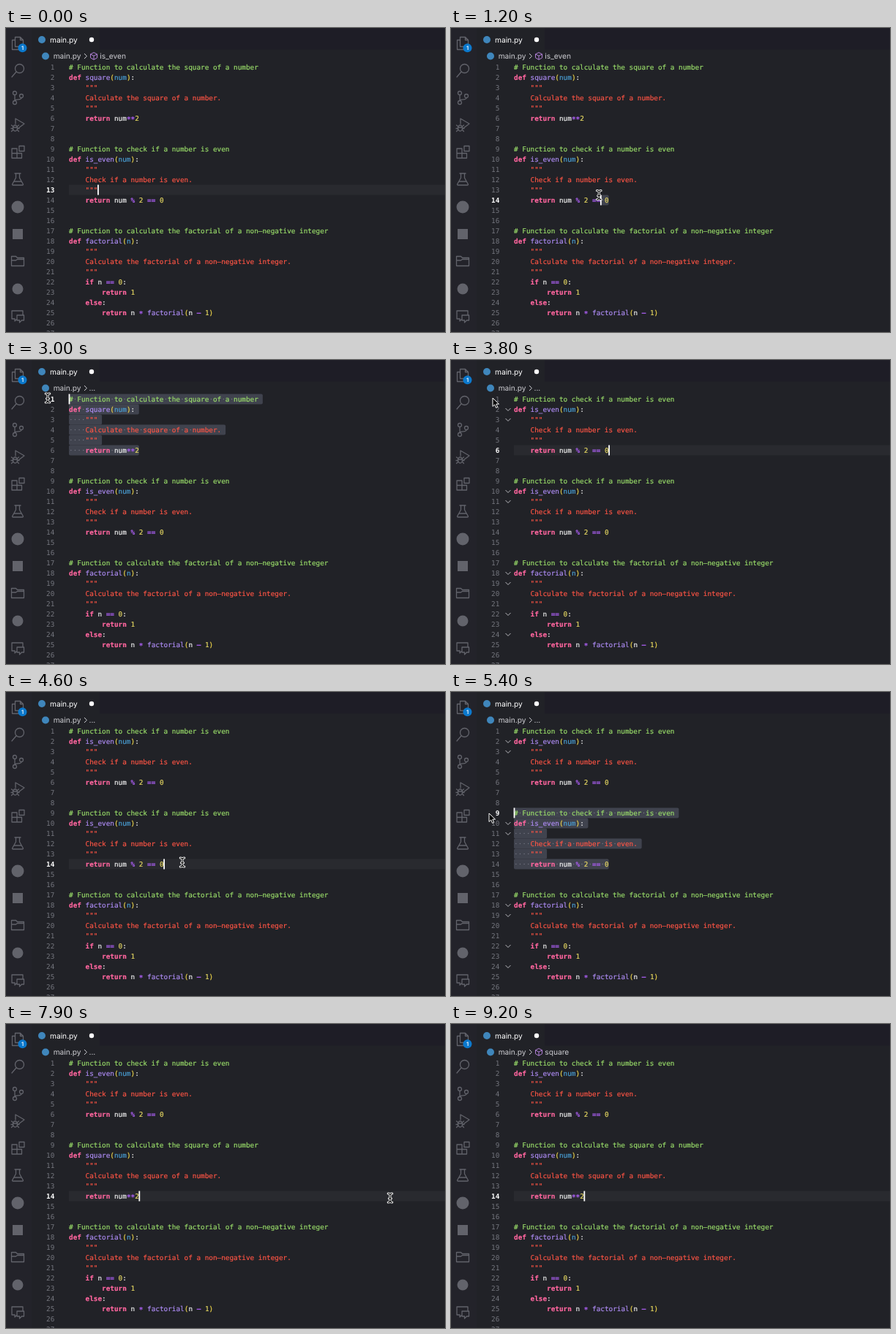
Write an HTML page that moves like this. It is 600 by 416 pixels and loops after 9.3 s.

```html
<!DOCTYPE html>
<html lang="en">
<head>
<meta charset="utf-8">
<title>Code editor</title>
<style>
  html, body { margin: 0; width: 100%; height: 100%; overflow: hidden; background: #212227; }
  svg { display: block; width: 100vw; height: 100vh; }
  text { text-rendering: geometricPrecision; }
  .code { font: 9.36px "DejaVu Sans Mono", "Liberation Mono", monospace; }
  .code text { stroke-width: .18; }
  .ui { font: 10.2px Inter, "Open Sans", sans-serif; }
  .icons { fill: none; stroke: #62636b; stroke-width: 1.3; stroke-linejoin: round; stroke-linecap: round; }
  .icons .solid { fill: #62636b; stroke: none; }
</style>
</head>
<body>
<svg viewBox="0 0 600 416" preserveAspectRatio="none">
  <rect width="600" height="416" fill="#212227"/>
  <rect x="35" width="565" height="29.5" fill="#1e1d26"/>
  <rect x="35" width="93" height="30" fill="#212227"/>
  <rect width="35" height="416" fill="#23232a"/>

  <g class="icons">
    <path d="M12.500 12.500h7l4 4v9h-11zM19.500 12.500v4h4M12.500 16.500h-4v13h9v-4"/>
    <g transform="translate(16 58)"><circle cx="2.500" cy="-2.500" r="6"/><path d="M-2 2l-6 7"/></g>
    <g transform="translate(16 95)">
      <circle cx="-4" cy="-6" r="2.500"/><circle cx="-4" cy="7" r="2.500"/><circle cx="5" cy="-2" r="2.500"/>
      <path d="M-4-3.500v8M5 .500c0 3-4 2-8 3"/>
    </g>
    <g transform="translate(16 133)">
      <path d="M-3-2v-7l12 7-8 6"/><ellipse cx="-3.500" cy="4" rx="3" ry="4"/>
      <path d="M-6.500 3h6M-8.500 0l2 1.500M-9 4.500h2.500M-8.500 8.500l2-2M1.500 0l-2 1.500M2 4.500h-2.500M1.500 8.500l-2-2"/>
    </g>
    <g transform="translate(16 170)"><path d="M-8-5h7v13h-7zM-8 1.500h13.500v6.500h-6.500"/><rect x="2" y="-8.500" width="7" height="7"/></g>
    <g transform="translate(16 207)"><path d="M-4-8h8M-2.500-8v6l-5 9q0 1 1 1h13q1 0 1-1l-5-9v-6M-5 3h10"/></g>
    <circle class="solid" cx="16" cy="245" r="8.500"/>
    <rect class="solid" x="9" y="275" width="14" height="14"/>
    <g transform="translate(16 319)"><path d="M-8.500-6.500h6l2 2h9v11h-17zM-8.500-1h6l2-1.500h9"/></g>
    <circle class="solid" cx="16" cy="357" r="7.500"/>
    <g transform="translate(16 394)"><path d="M-4 4h-4v-11h15v5M-4 4v3l2-2M-1-1h9.500v7h-3l-3 3v-3h-3.500z"/></g>
  </g>
  <circle cx="22.500" cy="27.300" r="6" fill="#0b78cc"/>
  <text class="ui" x="22.500" y="30" fill="#fff" style="font-size:7.500px;font-weight:600" text-anchor="middle">1</text>

  <circle cx="49" cy="16" r="5" fill="#3f86bb"/>
  <text class="ui" x="60" y="19.800" fill="#fff">main.py</text>
  <circle cx="117" cy="16" r="3.200" fill="#fff"/>
  <circle cx="54" cy="38.500" r="5" fill="#3f86bb"/>
  <text class="ui" x="64.700" y="42" fill="#cdcdd2">main.py</text>
  <path d="M107 35l3.500 3.500-3.500 3.500" fill="none" stroke="#cdcdd2"/>
  <path id="cube" d="M120 33.500l4.500 2.300v5l-4.500 2.500-4.500-2.500v-5zM115.500 35.800l4.500 2.400 4.500-2.400M120 38.200v5" fill="none" stroke="#b180d7"/>
  <text id="crumb" class="ui" y="42" fill="#cdcdd2"></text>

  <g id="editor" class="code"></g>
  <path id="arrow" d="M0 0v11.500l2.700-2.500 1.900 4.400 2.100-.9-1.900-4.300h3.700z" fill="#000" stroke="#fff"/>
  <g id="beam" fill="none" stroke-linecap="round">
    <use href="#bar" stroke="#fff" stroke-width="3"/>
    <use href="#bar" stroke="#000" stroke-width="1.100"/>
  </g>
  <defs><path id="bar" d="M-2.800-6q2.800 0 2.800 2v8q0 2-2.800 2M2.800-6q-2.800 0-2.800 2v8q0 2 2.800 2M-1.500 .800h3"/></defs>
</svg>
<script>
const LOOP = 9300, LEFT = 86, TOP = 46.5, ROW = 14, BASE = 10.2, CHAR = 5.635;
const $ = id => document.getElementById(id);

const func = (what, sign, doc, body) =>
  [`# Function to ${what}`, `def ${sign}:`, '    """', `    ${doc}.`, '    """', ...body.map(s => '    ' + s)];
const SQUARE = func('calculate the square of a number', 'square(num)',
  'Calculate the square of a number', ['return num**2']);
const EVEN = func('check if a number is even', 'is_even(num)',
  'Check if a number is even', ['return num % 2 == 0']);
const FACTORIAL = func('calculate the factorial of a non–negative integer', 'factorial(n)',
  'Calculate the factorial of a non–negative integer',
  ['if n == 0:', '    return 1', 'else:', '    return n * factorial(n – 1)']);

const COLOR = {
  comment: '#9ade6a', doc: '#ff5545', keyword: '#ff669f', name: '#ae8cf5', param: '#4aa0d6',
  bracket: '#f3d94a', number: '#e8da62', operator: '#a45ce8', plain: '#f4f4f4'
};
const BOLD = ['keyword', 'operator'];

// Pointer stops: time, x, y
const PATH = [
  [500, 262, 300], [1000, 219, 236], [1100, 219, 236], [1600, 58, 165], [2200, 58, 165],
  [2500, 190, 124], [2600, 190, 124], [2900, 57, 52], [4000, 57, 52], [4400, 241, 233],
  [4700, 241, 233], [5300, 52, 166], [6300, 52, 166], [6800, 525, 238], [8500, 525, 238]
];
// Drags upwards from a line's end: press, release, time the selection ends, line
const DRAGS = [[1100, 1600, 2600, 14], [2600, 3100, 3500, 6], [4500, 5400, 6800, 14]];
const BLINKS = [0, 1100, 1600, 2600, 3000, 3500, 4500, 5300, 5900, 6800];

function pointer(t) {
  const i = PATH.findIndex(p => p[0] > t);
  if (i < 1) return PATH[i < 0 ? PATH.length - 1 : 0].slice(1);
  const [t0, x0, y0] = PATH[i - 1], [t1, x1, y1] = PATH[i];
  const u = (t - t0) / (t1 - t0), e = u * u * (3 - 2 * u);
  return [x0 + (x1 - x0) * e, y0 + (y1 - y0) * e];
}

const rowTop = line => TOP + (line - 1) * ROW;
const colX = col => LEFT + col * CHAR;
const rect = (x, y, w, h, fill, r = 0) =>
  `<rect x="${x}" y="${y}" width="${w}" height="${h}" rx="${r}" fill="${fill}"/>`;

function label(x, line, s, kind) {
  const color = COLOR[kind];
  const drop = s[0] === '*' ? 1.6 : 0; // centre asterisks on the row
  return `<text x="${x}" y="${rowTop(line) + BASE + drop}" fill="${color}" stroke="${color}"` +
    `${BOLD.includes(kind) ? ' font-weight="700"' : ''}>${s}</text>`;
}

function kindOf(word, rest, isDef) {
  if (/^(def|return|if|else)$/.test(word)) return 'keyword';
  if (/^\d/.test(word)) return 'number';
  if (/^[()]/.test(word)) return 'bracket';
  if (/^[*%=–]/.test(word)) return 'operator';
  if (rest[0] === '(') return 'name';
  return isDef && word !== ':' ? 'param' : 'plain';
}

function drawLine(s, line) {
  const trimmed = s.trim(), start = colX(s.length - trimmed.length);
  if (s[0] === '#') return label(LEFT, line, s, 'comment');
  if (/^("""|[A-Z])/.test(trimmed)) return label(start, line, trimmed, 'doc');
  const isDef = s.startsWith('def');
  return [...s.matchAll(/\w+|[*%=–]+|[():]/g)].map(m =>
    label(colX(m.index), line, m[0], kindOf(m[0], s.slice(m.index + m[0].length), isDef))).join('');
}

function selection(lines, head, anchor) {
  let out = '';
  for (let n = head.line; n <= anchor.line; n++) {
    const s = lines[n - 1], last = n === anchor.line;
    const from = n === head.line ? head.col : 0, to = last ? anchor.col : s.length;
    const y = rowTop(n);
    out += rect(colX(from), y, Math.max(0, to - from + (last ? 0 : 1)) * CHAR, ROW, '#40434e', 2);
    for (let c = from; c < to; c++)
      if (s[c] === ' ') out += `<circle cx="${colX(c + .5)}" cy="${y + 7}" r=".7" fill="#747783"/>`;
  }
  return out;
}

function draw(t) {
  const lines = [...(t < 3500 ? SQUARE : EVEN), '', '', ...(t < 5900 ? EVEN : SQUARE), '', '', ...FACTORIAL, '', ''];
  const end = line => ({ line, col: lines[line - 1].length });
  const [mx, my] = pointer(t);
  const shown = t >= 500 && t < 8500;
  const drag = DRAGS.find(d => t >= d[0] && t < d[2]);
  const inGutter = shown && mx < 80 && !(drag && t < drag[1]);

  let anchor = t < 1100 ? end(13) : t >= 3500 && t < 4500 ? end(6) : end(14);
  let head = anchor;
  if (drag) {
    const [x, y] = pointer(Math.min(t, drag[1]));
    anchor = end(drag[3]);
    const line = Math.min(drag[3], Math.max(1, Math.floor((y - TOP) / ROW) + 1));
    head = { line, col: Math.min(lines[line - 1].length, Math.max(0, Math.round((x - LEFT) / CHAR))) };
  }
  const empty = head.line === anchor.line && head.col === anchor.col;

  let out = empty ? rect(LEFT, rowTop(head.line), 514, ROW, '#292a2f') : selection(lines, head, anchor);
  lines.forEach((s, i) => {
    const n = i + 1, on = n === head.line;
    out += `<text x="66.300" y="${rowTop(n) + BASE}" text-anchor="end" fill="${on ? '#fff' : '#74767e'}"${on ? ' font-weight="700"' : ''}>${n}</text>`;
    out += drawLine(s, n);
    if (inGutter && /^def|^\s+(if|else)|^    """/.test(s) && !/\.$/.test(lines[i - 1]))
      out += `<path d="M74.500 ${rowTop(n) + 5.5}l3.500 3.500 3.500-3.500" fill="none" stroke="#b9b9be"/>`;
  });
  const since = t - BLINKS.filter(b => b <= t).pop();
  if (since % 1000 < 500) out += rect(colX(head.col) - .4, rowTop(head.line), 1.8, ROW, '#fff');
  $('editor').innerHTML = out;

  const scope = t < 1500 ? 'is_even' : t < 8700 ? '' : 'square';
  $('cube').style.display = scope ? '' : 'none';
  $('crumb').textContent = scope || '...';
  $('crumb').setAttribute('x', scope ? 128.3 : 113.5);

  $('arrow').style.display = inGutter ? '' : 'none';
  $('beam').style.display = shown && !inGutter ? '' : 'none';
  for (const id of ['arrow', 'beam']) $(id).setAttribute('transform', `translate(${mx} ${my})`);
}

let lastTick = -1;
const began = performance.now();
function frame() {
  const tick = Math.floor(Math.max(0, performance.now() - began) % LOOP / 100);
  if (tick !== lastTick) draw((lastTick = tick) * 100);
  requestAnimationFrame(frame);
}
frame();
</script>
</body>
</html>
```
